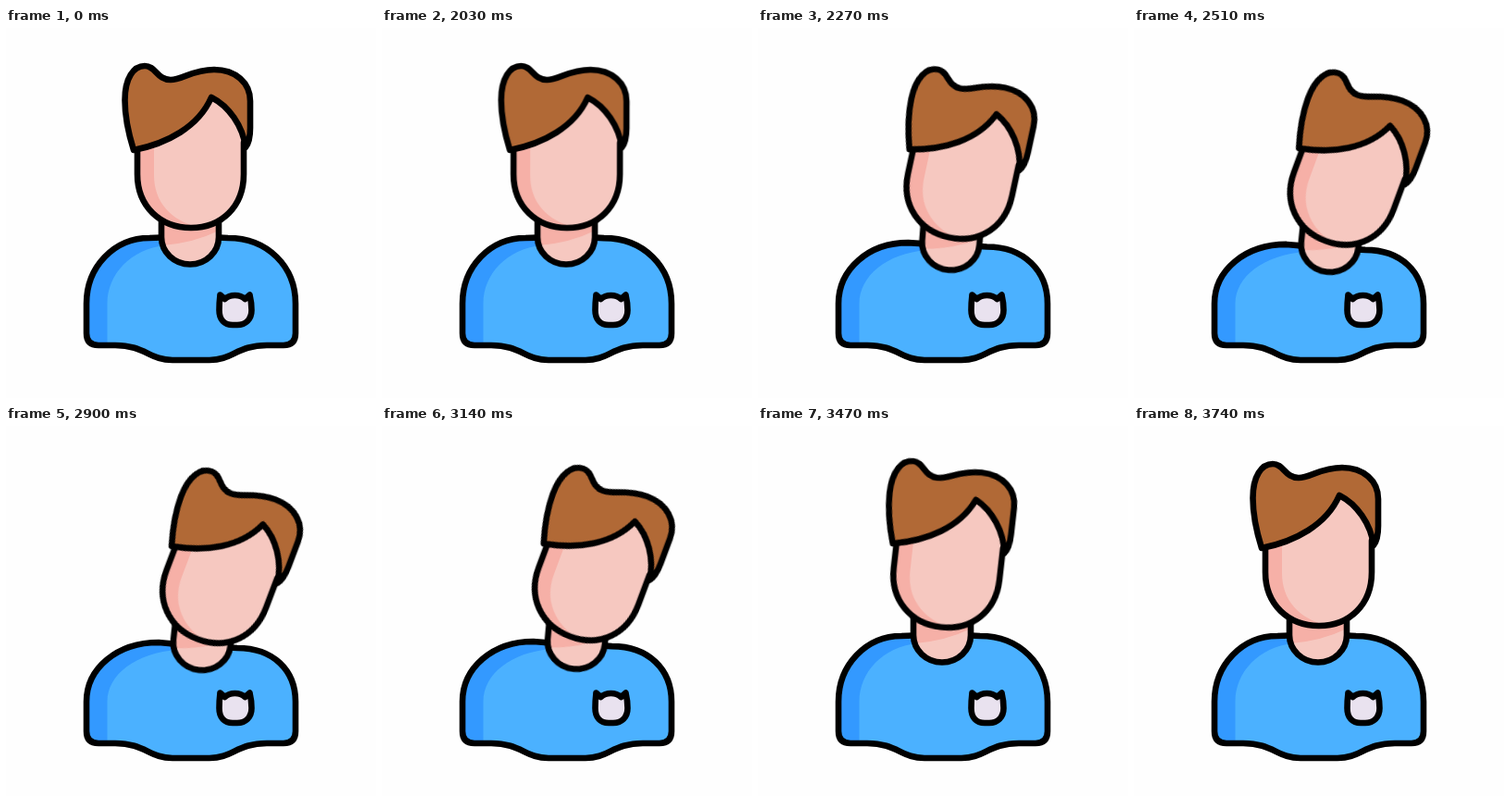
Animation of 400x400 px, one loop 3.77 s. Source, as an HTML page:

```html
<!DOCTYPE html>
<html lang="en">
<head>
<meta charset="utf-8">
<title>Head tilt</title>
<style>
  html, body { margin: 0; width: 100%; height: 100%; overflow: hidden; background: #fefefe; }
  svg { display: block; width: 100%; height: 100%; }

  :root { --lean: cubic-bezier(.38, .02, .58, 1); --back: cubic-bezier(.3, .05, .5, 1); }

  .line { stroke: #000; stroke-width: 6.6; stroke-linejoin: round; stroke-linecap: round; }
  .open { fill: none; }
  .shirt { fill: #4bb1ff; }
  .shirt-shade { fill: #3399ff; }
  .skin { fill: #f6c8c0; }
  .skin-shade { fill: #f6b0a7; }
  .hair { fill: #b16936; }
  .badge { fill: #e9e2ef; }

  .head, .tilt, .neck, .torso, .torso-shade { animation: 3770ms linear infinite; }
  .head { animation-name: head; }
  .tilt { animation-name: tilt; transform-origin: 186px 198px; }
  .neck { animation-name: neck; transform-origin: 199px 226px; }
  .torso, .torso-shade { animation-name: morph; }

  .torso {
    --rest: path("M168 226.5 L155 227 C117 227 87 258 87 298 L87 330 Q87 343 100 343 L118 343 C150 343 155 359 180 359 L220 359 C245 359 250 343 282 343 L300 343 Q313 343 313 330 L313 298 C313 258 283 227 240 227 L230 226.5 Z");
    --bent: path("M181 235.5 L165 234 C120 234 87 262 87 298 L87 330 Q87 343 100 343 L118 343 C150 343 155 359 180 359 L220 359 C245 359 250 343 282 343 L300 343 Q313 343 313 330 L313 298 C313 264 289 240 250 240 L242 239.5 Z");
  }
  .torso-shade {
    --rest: path("M168 227 L155 227 C117 227 87 258 87 298 L87 330 Q87 343 100 343 L109.5 343 L109.5 298 C109.5 266 135 239 172 235 Z");
    --bent: path("M181 235.5 L165 234 C120 234 87 262 87 298 L87 330 Q87 343 100 343 L109.5 343 L109.5 298 C109.5 269 140 245 186 242 Z");
  }

  @keyframes head {
    0%, 53.58% { transform: translate(0, 0); animation-timing-function: var(--lean); }
    68.7% { transform: translate(14.6px, 10.7px); }
    81.96% { transform: translate(14.6px, 10.7px); animation-timing-function: var(--back); }
    89.12%, 100% { transform: translate(0, 0); }
  }
  @keyframes tilt {
    0%, 53.58% { transform: rotate(0deg); animation-timing-function: cubic-bezier(.28, .05, .45, 1); }
    68.7% { transform: rotate(20.7deg); }
    81.96% { transform: rotate(20.7deg); animation-timing-function: cubic-bezier(.45, 0, .5, 1); }
    99.2%, 100% { transform: rotate(0deg); }
  }
  @keyframes neck {
    0%, 53.58% { transform: translate(0, 0) rotate(0deg); animation-timing-function: var(--lean); }
    68.7% { transform: translate(12.8px, 8.5px) rotate(6deg); }
    81.96% { transform: translate(12.8px, 8.5px) rotate(6deg); animation-timing-function: var(--back); }
    92.6%, 100% { transform: translate(0, 0) rotate(0deg); }
  }
  @keyframes morph {
    0%, 53.58% { d: var(--rest); animation-timing-function: var(--lean); }
    68.7% { d: var(--bent); }
    81.96% { d: var(--bent); animation-timing-function: var(--back); }
    92.6%, 100% { d: var(--rest); }
  }
</style>
</head>
<body>
<svg viewBox="0 0 400 400">
  <path class="torso shirt"/>
  <path class="torso-shade shirt-shade"/>
  <path class="torso line open"/>

  <path class="badge line" d="M231.5 288.5 L236.5 293 Q241 289 247.5 289 T258.5 293 L263.5 288.5 Q265.5 297 265.5 305 C265.5 315 259 321 250 321 H245 C236 321 230.5 315 230.5 305 Q230.5 297 231.5 288.5 Z"/>

  <g class="neck">
    <path class="skin" d="M168 195 V226 A31 29.5 0 0 0 230 226 V195 Z"/>
    <path class="skin-shade" d="M168 195 V226 Q168.5 231 170 235 Q204 232 230 219 V195 Z"/>
    <path class="line open" d="M168 200 V226 A31 29.5 0 0 0 230 226 V200"/>
  </g>

  <g class="head">
    <g class="tilt">
      <path class="skin" d="M142 125 V158 C142 193 167 216 200 216 S257 193 257 158 V110 L222 72 Z"/>
      <path class="skin-shade" d="M142 122 H160 V159 C160 188 178 208 208 215.5 L200 216 C167 216 142 193 142 158 Z"/>
      <path class="line open" d="M142 130 V158 C142 193 167 216 200 216 S257 193 257 158 V124"/>
      <path class="hair line" d="M138 132 C133 116 128.5 98 128.5 78 C128.5 54 138 41 150 41 C162 41 163 56 178 56 C190 56 202 45 225 45 C248 45 264 59 264 79 V108 C264 118 263 124 259 129 C256 106 241 84.5 222 75 C208 107 174 125 138 132 Z"/>
    </g>
  </g>
</svg>
</body>
</html>
```
